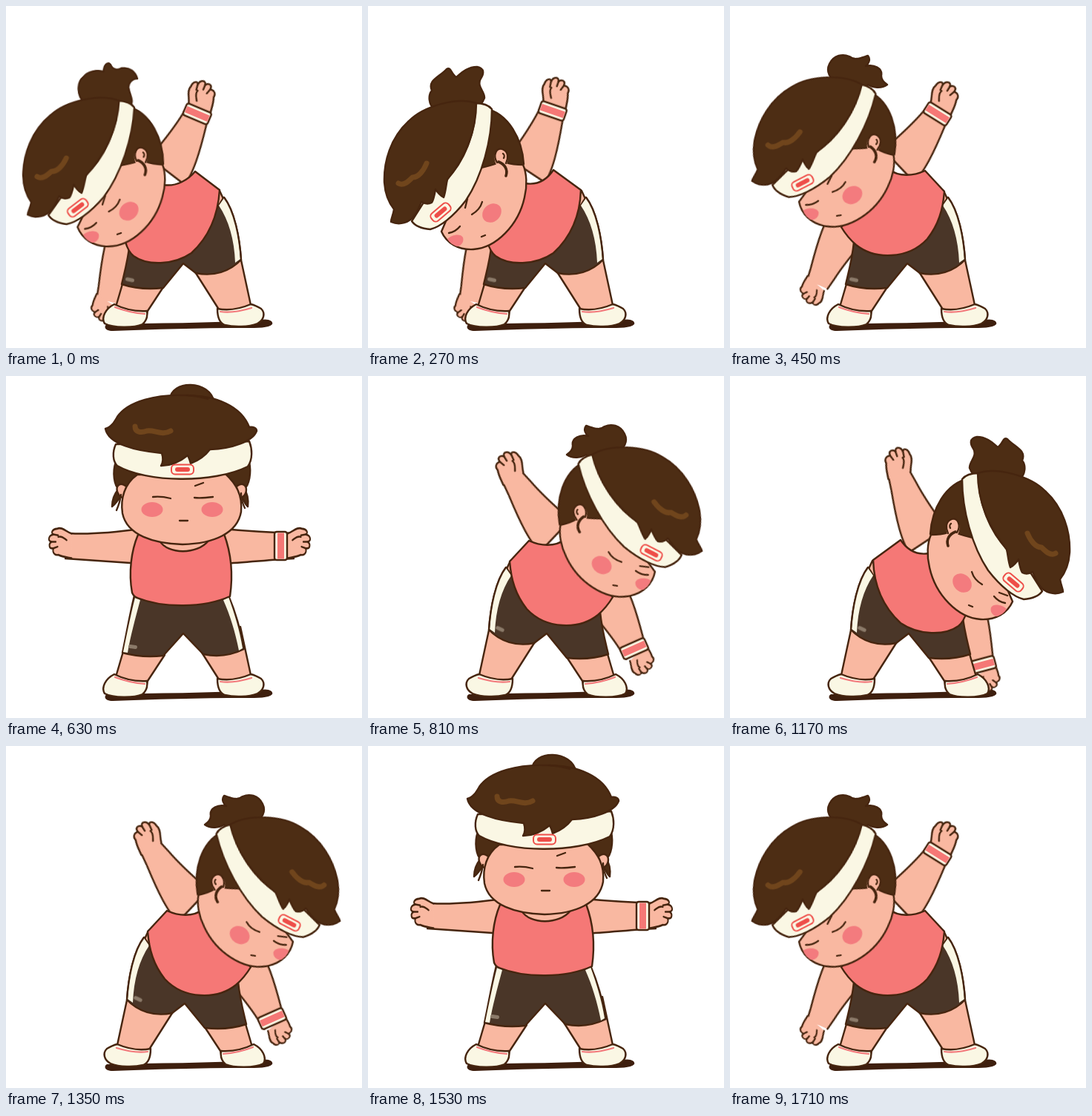
Animation, 480 px wide and 461 px high, one loop 1800 ms. Source, as an HTML page without scripts:

```html
<!DOCTYPE html>
<html lang="en">
<head>
<meta charset="utf-8">
<title>Side bends</title>
<style>
html, body { margin: 0; width: 100%; height: 100%; overflow: hidden; background: #fff; }
svg { display: block; width: 100%; height: 100%; stroke-linecap: round; stroke-linejoin: round; }

.ink { stroke: #46250f; stroke-width: 2.4; }
.line { fill: none; stroke: #46250f; stroke-width: 2.3; }
.strand { fill: none; stroke: #46250f; stroke-width: 3.6; }
.skin { fill: #f9b8a1; }
.hair { fill: #4d2d14; }
.shirt { fill: #f57876; }
.shorts { fill: #4a3628; }
.cream { fill: #faf7e4; }
.blush { fill: #f37b7e; }
.shine { fill: none; stroke: #70451c; stroke-width: 7; }
.red { fill: none; stroke: #f3797b; stroke-width: 2.2; }
.patch { fill: #faf7e4; stroke: #ee4e49; stroke-width: 2; }
.bar { fill: #ee4e49; }
.mark { fill: #8b7a69; }

/* One bend takes 0.9 s; every second one is mirrored. */
.head, .up, .low, .torso, .bun, .rig, .front { animation: .9s step-end -2ms infinite; }
.flip, .left, .right { animation: 1.8s step-end -2ms infinite; }
.flip { animation-name: flip; }
.left { animation-name: left; }
.right { animation-name: right; }
.rig { animation-name: rig; }
.front { animation-name: front; }
.head { animation-name: head; }
.up { animation-name: up; }
.low { animation-name: low; }
.torso { animation-name: torso; }
.bun.deep { animation-name: bun-deep; }
.bun.sway { animation-name: bun-sway; }
.bun.side { animation-name: bun-side; }

@keyframes flip {
  0%, 85% { transform: none; }
  40% { transform: translate(480px) scaleX(-1); }
}
@keyframes left { 0%, 85% { opacity: 1; } 40% { opacity: 0; } }
@keyframes right { 0%, 85% { opacity: 0; } 40% { opacity: 1; } }
@keyframes rig { 0%, 80% { opacity: 1; } 70% { opacity: 0; } }
@keyframes front { 0%, 80% { opacity: 0; } 70% { opacity: 1; } }
@keyframes bun-deep { 0%, 40% { opacity: 0; } 10% { opacity: 1; } }
@keyframes bun-sway { 0%, 40% { opacity: 1; } 10%, 50% { opacity: 0; } }
@keyframes bun-side { 0% { opacity: 0; } 50% { opacity: 1; } }

@keyframes head {
  0%, 40% { transform: translate(118px, 250px) rotate(3deg) translate(-118px, -255px); }
  10%, 30% { transform: none; }
  20% { transform: translate(117px, 257px) rotate(-1.5deg) translate(-118px, -255px); }
  50%, 90% { transform: translate(122.6px, 220.4px) rotate(13deg) translate(-118px, -255px); }
  60%, 80% { transform: translate(153px, 194px) rotate(22deg) translate(-118px, -255px); }
}
@keyframes up {
  0%, 40% { transform: translate(258px, 145px) rotate(23deg); }
  10%, 30% { transform: translate(249px, 141px) rotate(19deg); }
  20% { transform: translate(247px, 141px) rotate(18deg); }
  50%, 90% { transform: translate(280px, 145px) rotate(32deg); }
  60%, 80% { transform: translate(321px, 163px) rotate(50deg); }
}
@keyframes low {
  0%, 40% { transform: translate(139px, 390px) rotate(196deg); }
  10%, 30% { transform: translate(140px, 390px) rotate(195deg); }
  20% { transform: translate(141px, 391px) rotate(194deg); }
  50%, 90% { transform: translate(121px, 368px) rotate(204deg); }
  60%, 80% { transform: translate(92px, 314px) rotate(228deg); }
}
@keyframes torso {
  0%, 40% { d: path("M212 241C230 244 246 234 255 223L288 248C286 280 275 310 250 333C225 350 190 350 172 337C166 332 163 325 161 318L200 260Z"); }
  10%, 30% { d: path("M212 239C230 242 242 233 250 221L287 248C286 280 275 310 250 333C225 350 190 350 172 337C166 332 163 325 161 318L200 260Z"); }
  20% { d: path("M212 240C230 243 241 233 248 221L287 248C286 280 275 310 250 333C225 351 190 351 172 338C166 333 163 326 161 319L200 260Z"); }
  50%, 90% { d: path("M214 220C228 231 248 229 263 222L289 250C287 275 281 295 266 314C240 342 195 342 170 322C163 316 156 308 150 298L200 250Z"); }
  60%, 80% { d: path("M214 217C240 225 265 222 283 215L296 252C296 285 285 305 268 316C240 330 200 328 172 312C168 306 166 298 165 288L200 230Z"); }
}
</style>
</head>
<body>
<svg viewBox="0 0 480 461" preserveAspectRatio="none">
  <defs>
    <!-- Origin is the wrist, fingers point up. -->
    <g id="hand">
      <path class="skin ink" d="M-15-8C-17-16-24-24-21-32C-21-39-16-43-14-38C-13-46-6-48-5-41C-3-46 4-46 3-38C8-40 12-36 11-30C14-22 14-14 15-8"/>
      <path class="line" d="M-14-38L-13-30M-5-41L-5-34M3-38L1-31M-11-30C-13-24-9-20-7-16"/>
    </g>
    <path id="arm" class="skin ink" d="M-15-8L-18 8C-22 35-30 60-36 80L22 95C26 75 24 50 17 8L15-8"/>
    <g id="band">
      <rect class="cream ink" x="-18" y="-8" width="36" height="17" rx="3"/>
      <rect class="shirt" x="-16.500" y="-4" width="33" height="9"/>
    </g>
    <g id="patch">
      <rect class="patch" x="-15" y="-6.500" width="30" height="13" rx="5"/>
      <rect class="bar" x="-10" y="-3" width="20" height="6" rx="3"/>
    </g>
    <rect id="mark" class="mark" x="-6" y="-2.500" width="12" height="5" rx="2.500"/>
    <g id="legs">
      <path class="skin ink" d="M159 368L147 409L189 419L191 411L214 376Z"/>
      <path class="skin ink" d="M254 357L287 409L289 418L330 412L330 403L316 338Z"/>
      <path class="cream ink" d="M146 402C134 408 128 420 133 428C145 434 172 434 184 429C190 424 191 417 190 411C174 412 158 408 146 402Z"/>
      <path class="red" d="M147 406C160 411 172 414 187 415"/>
      <path class="cream ink" d="M285 408C285 418 287 427 295 430C307 433 327 433 339 428C348 423 350 414 344 408C339 405 335 403 330 402C316 408 300 411 285 408Z"/>
      <path class="red" d="M289 412C304 414 318 411 331 407"/>
    </g>
  </defs>

  <path fill="#3e1f0e" d="M136 429C200 427 275 428 344 423C354 421 361 425 359 429C354 434 340 434 322 434C260 434 200 436 144 438C132 438 132 431 136 429Z"/>

  <g class="rig"><g class="flip">
    <g class="low">
      <use href="#arm"/>
      <use href="#hand" transform="rotate(18) translate(0 -2) scale(1 .72)"/>
      <g class="right"><use href="#band"/></g>
    </g>
    <g class="up">
      <use href="#arm"/>
      <use href="#hand" transform="scale(1.060 .96)"/>
      <g class="left"><use href="#band"/></g>
    </g>
    <use href="#legs"/>
    <path class="skin ink" d="M284 248L288 249L294 262L282 285Z"/>
    <path class="shorts ink" d="M167 318C165 340 160 358 156 375C174 381 194 382 212 380L239 347L256 360C280 365 302 358 317 342C315 312 308 276 294 258C285 268 275 300 240 318Z"/>
    <path class="cream" d="M287 269L294 259C308 276 314 312 316 341L309 346C308 315 300 288 287 269Z"/>
    <path class="line" d="M294 258C308 276 315 312 317 342"/>
    <use class="left" href="#mark" transform="translate(167 369) rotate(12)"/>
    <use class="right" href="#mark" transform="translate(302 341) rotate(-25)"/>
    <path class="torso shirt ink" d="M212 241C230 244 246 234 255 223L288 248C286 280 275 310 250 333C225 350 190 350 172 337C166 332 163 325 161 318L200 260Z"/>

    <g class="head">
      <path class="bun deep hair ink" d="M90 140C81 132 81 120 86 114C80 100 96 96 106 85C112 81 112 92 119 96C126 90 134 82 147 82C158 84 156 92 152 98C146 108 158 116 157 124C154 132 150 136 140 140Z"/>
      <g transform="translate(-8 5)">
        <path class="bun sway hair ink" d="M108 132C96 122 96 104 104 97C110 88 122 86 131 88C131 80 135 73 140 78C143 84 148 86 155 82C166 80 174 86 177 95C170 95 165 102 166 108C168 118 174 124 170 132Z"/>
      </g>
      <g transform="translate(118 255) rotate(-13) translate(-122.600 -220.400)">
        <path class="bun side hair ink" d="M146 104C134 98 129 88 134 78C140 66 152 64 161 68C168 74 176 70 186 67C190 72 187 78 183 81C194 78 206 84 204 94C204 100 209 104 212 106C204 112 192 110 186 106L180 114Z"/>
      </g>
      <path class="hair ink" d="M158 138C190 145 208 180 210 213L204 220L150 225Z"/>
      <path class="skin ink" d="M99 304C106 320 122 329 142 328C173 326 203 295 211 258C215 242 214 225 209 214C200 214 192 213 186 211L174 212C166 215 158 217 149 219L120 255Z"/>
      <path class="skin" d="M173 214C167 201 173 191 181 193C190 196 190 207 186 216Z"/>
      <path class="line" d="M174 211C168 201 173 191 181 193C190 196 189 206 186 212M182 199C184 200 184 203 183 205"/>
      <path class="strand" d="M176 210C184 213 189 220 186 229"/>
      <ellipse class="blush" cx="167" cy="279" rx="14" ry="11.500" transform="rotate(-45 167 279)"/>
      <path class="blush" d="M107 314C113 308 125 306 128 312C130 318 125 324 120 324C114 322 110 319 107 314Z"/>
      <path class="line" d="M154 264C152 271 147 277 140 281M109 306C115 305 120 302 124 297M153 311L158 309"/>
      <path class="line left" d="M134 260L131 272"/>
      <path class="line right" d="M106 296L117 292"/>
      <path class="cream ink" d="M145 131C155 131 163 134 167 139C167 180 154 229 132 262C115 284 97 298 84 301C72 300 63 296 59 290L78 260L105 235C130 210 146 170 145 131Z"/>
      <path class="hair ink" d="M146 131C120 122 75 135 55 155C30 178 21 210 22 238C23 253 27 264 35 274C34 282 31 286 31 291C43 296 56 292 63 282C67 277 69 271 72 264C77 267 82 267 86 265C89 260 90 253 91 247C94 252 98 256 102 258C105 250 105 242 107 234C130 205 146 170 146 131Z"/>
      <path class="shine" d="M41 239C48 243 55 236 60 231C68 231 75 222 79 212"/>
      <use href="#patch" transform="translate(98 278) rotate(-40)"/>
    </g>
  </g></g>

  <g class="front">
    <path class="skin ink" d="M85 212C115 214 145 211 182 206L182 253L80 246"/>
    <use href="#hand" transform="translate(95 229) rotate(-90) scale(-1.100 .82)"/>
    <path class="skin ink" d="M388 212C355 211 325 209 292 206L292 253C325 251 355 248 388 246"/>
    <use href="#hand" transform="translate(373 229) rotate(90) scale(1.100 .82)"/>
    <use href="#band" transform="translate(371 229) rotate(90) scale(1.060 1)"/>
    <use href="#legs"/>
    <path class="shorts ink" d="M173 296C166 325 162 350 157 373C175 378 195 379 212 377L239 347L266 375C285 379 305 376 321 368C316 340 308 315 300 296Z"/>
    <path class="cream" d="M174 299L181 302C174 328 168 350 164 373L158 372C163 348 168 322 174 299Z"/>
    <path class="cream" d="M293 302L300 298C308 320 315 342 319 367L314 370C309 345 302 322 293 302Z"/>
    <use href="#mark" transform="translate(171 365) rotate(8)"/>
    <path class="shirt ink" d="M178 214C169 235 165 265 170 292C172 297 174 298 177 299C212 313 266 313 302 297C306 270 304 240 294 213Z"/>
    <path class="skin ink" d="M207 222C218 241 258 241 273 222Z"/>
    <path class="hair ink" d="M148 116C143 130 146 148 152 152C145 160 143 168 143 176C149 172 152 164 156 162L180 134Z"/>
    <path class="hair ink" d="M328 116C331 130 328 148 321 152C327 160 327 168 326 176C321 172 320 164 316 162L294 134Z"/>
    <path class="skin ink" d="M161 148C152 142 147 150 151 158C153 163 157 165 160 163"/>
    <path class="skin ink" d="M312 148C321 142 326 150 323 158C321 163 317 165 314 163"/>
    <path class="skin ink" d="M177 133C160 145 154 165 157 185C163 215 200 226 238 227C280 226 312 212 317 183C319 160 310 145 296 132Z"/>
    <path class="line" d="M155 160C154 168 152 174 149 181M317 158C317 167 319 172 322 178"/>
    <ellipse class="blush" cx="197" cy="180" rx="14.500" ry="10"/>
    <ellipse class="blush" cx="278" cy="180" rx="14.500" ry="10"/>
    <path class="line" d="M198 163C206 162 214 163 222 165M254 164C263 165 271 164 279 163M255 148L266 144M234 195L245 195"/>
    <path class="hair ink" d="M221 32C222 5 275 4 281 36Z"/>
    <path class="cream ink" d="M148 92C143 103 144 115 150 121C190 144 280 145 326 122C333 112 332 98 328 88Z"/>
    <path class="hair ink" d="M134 71C142 69 146 62 150 55C165 33 205 25 237 26C285 25 318 42 328 69C333 68 338 70 338 74C333 88 305 98 275 99C269 107 259 114 249 118C248 114 247 111 245 107C234 116 222 121 209 121C212 116 212 110 210 104C175 101 138 92 134 71Z"/>
    <path class="line" d="M245 26C256 27 264 28 272 31"/>
    <path class="shine" d="M174 68C174 76 182 77 190 74C200 72 210 81 222 74"/>
    <use href="#patch" transform="translate(238 126)"/>
  </g>
</svg>
</body>
</html>
```
